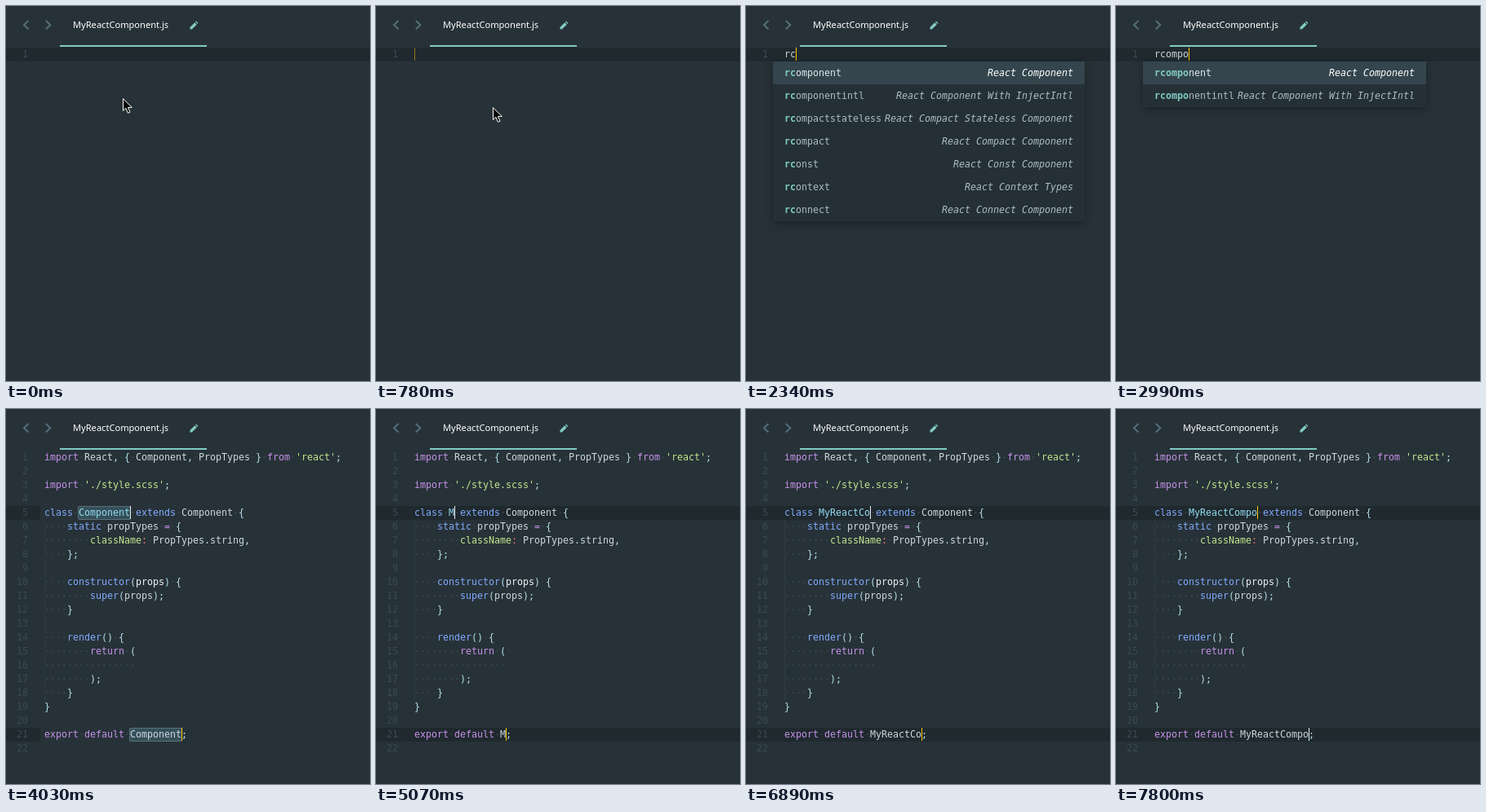
An HTML page that plays this animation: 446x460 px, repeating every 8 s.

```html
<!DOCTYPE html>
<html lang="en">
<head>
<meta charset="utf-8">
<title>Component snippet</title>
<style>
  html, body { margin: 0; width: 100%; height: 100%; overflow: hidden; background: #273238; }
  #stage { position: relative; width: 446px; height: 460px; overflow: hidden; background: #273238;
    color: #cdd9de; font: 11.63px/17px "DejaVu Sans Mono", monospace; white-space: pre; }
  #stage svg { position: absolute; left: 0; top: 0; }
  #tab { position: absolute; left: 82px; top: 14px; color: #fff; font: 500 11.1px/18px "Noto Sans", sans-serif; }
  #line { position: absolute; left: 66px; top: 48px; width: 180px; height: 2px; background: #80cbc4; }
  .row { position: absolute; left: 0; width: 446px; height: 17px; }
  .row.active { background: #1f292e; }
  .row.gutter { background: linear-gradient(90deg, #1f292e 42px, transparent 0); }
  .num { position: absolute; left: 0; width: 27px; text-align: right; color: #3a4a53; }
  .code { position: absolute; left: 47px; }
  .guide { position: absolute; left: 47px; top: 136px; width: 1px; height: 221px; background: #2e3c43; }
  .keyword { color: #c792ea; }
  .storage { color: #82aaff; }
  .string, .key { color: #c3e88d; }
  .colon { color: #f07178; }
  .type { color: #92dcf2; }
  .punct { color: #b4e0ea; }
  .space { color: #3a4b53; }
  .param { color: #f0f6f8; }
  .selection { position: absolute; top: 0; height: 15px; background: #36505a; border: 1px solid #597078;
    border-radius: 2px; box-sizing: content-box; }
  .caret { position: absolute; top: 0; width: 1px; height: 16px; }
  #popup { position: absolute; left: 33px; top: 68px; background: #243036; color: #aebdc4;
    box-shadow: 0 3px 10px rgba(0, 0, 0, .35); }
  .item { display: flex; justify-content: space-between; gap: 4px; height: 28px; padding: 0 14px; line-height: 28px; }
  .item:first-child { background: #34454d; color: #e2eaed; }
  .item b { color: #80cbc4; }
  .item:first-child i { color: #fff; }
</style>
</head>
<body>
<div id="stage">
  <svg width="446" height="50" fill="none" stroke="#546e7a" stroke-width="2">
    <path d="M27.5 18 22 23.2 27.5 28.4M48.8 18 54.3 23.2 48.8 28.4"/>
    <path d="M225.5 28.5v-2.4l5.8-5.8 2.4 2.4-5.8 5.8zM232 19.6l1-1 2.4 2.4-1 1z" fill="#80cbc4" stroke="none"/>
  </svg>
  <div id="tab">MyReactComponent.js</div>
  <div id="line"></div>
  <div id="editor"></div>
  <div id="popup"></div>
  <svg id="mouse" width="16" height="22" viewBox="-1 -1 16 22">
    <path d="M.5.7V15.5L3.9 12.3 6.4 18.3 9 17.2 6.5 11.4H11.3Z" fill="#000" stroke="#fff"/>
  </svg>
</div>
<script>
const LOOP = 8000, LEFT = 47, TOP = 51, CHAR = 7, LINE = 17;
const $ = id => document.getElementById(id);

const snippet = name => `import React, { Component, PropTypes } from 'react';

import './style.scss';

class ${name} extends Component {
    static propTypes = {
        className: PropTypes.string,
    };

    constructor(props) {
        super(props);
    }

    render() {
        return (
                
        );
    }
}

export default ${name};
`.split('\n');

// line index and column where the shared name begins
const slots = [[4, 6], [20, 15]];

const suggestions = [
  ['rcomponent', 'React Component'],
  ['rcomponentintl', 'React Component With InjectIntl'],
  ['rcompactstateless', 'React Compact Stateless Component'],
  ['rcompact', 'React Compact Component'],
  ['rconst', 'React Const Component'],
  ['rcontext', 'React Context Types'],
  ['rconnect', 'React Connect Component'],
];

// each step changes part of the state and keeps the rest
const steps = [
  [0, { typed: '', name: null, selected: false, popup: false, caret: 0, mouse: 113 }],
  [130, { mouse: 115 }],
  [260, { mouse: 118, caret: .5 }],
  [390, { mouse: 121, caret: 1 }],
  [520, { mouse: 123 }],
  [650, { mouse: 124 }],
  [780, { caret: .5 }],
  [910, { caret: 0, mouse: null }],
  [1430, { caret: .5 }],
  [1560, { caret: 1 }],
  [1820, { typed: 'r' }],
  [2080, { popup: true }],
  [2340, { typed: 'rc' }],
  [2470, { typed: 'rco' }],
  [2600, { typed: 'rcom' }],
  [2730, { typed: 'rcomp' }],
  [2990, { typed: 'rcompo' }],
  [3770, { popup: false, name: 'Component', selected: true }],
  [4420, { caret: .6 }],
  [4550, { caret: .3 }],
  [4680, { caret: 0 }],
  [5070, { name: 'M', selected: false, caret: 1 }],
  ...[5330, 5590, 5850, 5980, 6110, 6370, 6630, 6890, 7020, 7280, 7540]
    .map((time, i) => [time, { name: 'MyReactCompo'.slice(0, i + 2) }]),
];

const tokens = new RegExp([
  "(?<string>'[^']*')",
  '(?<keyword>\\b(?:import|from|export|default|return)\\b|=)',
  '(?<storage>\\b(?:class|static|extends|constructor|super|render)\\b)',
  '(?<type>(?<=class )\\w+)',
  '(?<key>className)',
  '(?<param>(?<=constructor\\()props)',
  '(?<colon>:)',
  '(?<punct>[{}();,.]+)',
  '(?<space> +)',
].join('|'), 'g');

function highlight(text) {
  return text.replace(tokens, (match, ...rest) => {
    const groups = rest.at(-1);
    const kind = Object.keys(groups).find(key => groups[key] !== undefined);
    return `<span class="${kind}">${kind === 'space' ? '·'.repeat(match.length) : match}</span>`;
  });
}

function caretHtml(column, opacity) {
  const color = column % 2 ? '#e8f2f2' : '#ffcc00';
  return `<div class="caret" style="left:${LEFT + column * CHAR}px;background:${color};opacity:${opacity}"></div>`;
}

function rowHtml(text, index, state) {
  const slot = state.name === null ? [0, 0] : slots.find(([line]) => line === index);
  const value = state.name ?? state.typed;
  let mark = '', caret = '', style = '';
  if (slot) {
    const start = slot[1];
    style = state.selected ? 'gutter' : 'active';
    caret = caretHtml(start + value.length, state.caret);
    if (state.selected) {
      mark = `<div class="selection" style="left:${LEFT + start * CHAR - 1}px;width:${value.length * CHAR}px"></div>`;
    }
  }
  return `<div class="row ${style}" style="top:${TOP + index * LINE}px">${mark}` +
    `<span class="num">${index + 1}</span><span class="code">${highlight(text)}</span>${caret}</div>`;
}

function itemHtml([word, note], typed) {
  return `<div class="item"><span><b>${typed}</b>${word.slice(typed.length)}</span><i>${note}</i></div>`;
}

function render(state) {
  const lines = state.name === null ? [state.typed] : snippet(state.name);
  const guide = state.name === null ? '' : '<div class="guide"></div>';
  $('editor').innerHTML = guide + lines.map((text, i) => rowHtml(text, i, state)).join('');
  $('popup').innerHTML = state.popup
    ? suggestions.filter(([word]) => word.startsWith(state.typed)).map(item => itemHtml(item, state.typed)).join('')
    : '';
  $('mouse').style.display = state.mouse === null ? 'none' : '';
  $('mouse').style.transform = `translate(142px, ${state.mouse - 1}px)`;
}

let shown = -1;
function tick() {
  const time = performance.now() % LOOP;
  const current = steps.findLastIndex(([start]) => start <= time);
  if (current !== shown) {
    shown = current;
    render(Object.assign({}, ...steps.slice(0, current + 1).map(([, change]) => change)));
  }
  requestAnimationFrame(tick);
}
tick();
</script>
</body>
</html>
```
